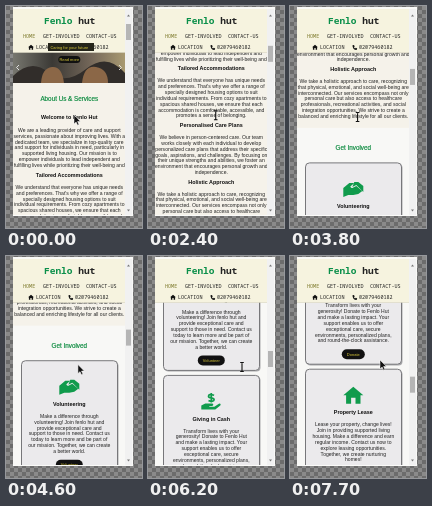
Animation, 136 px wide and 222 px high, one loop 8 s. Source, as an HTML page:

```html
<!DOCTYPE html>
<html lang="en">
<head>
<meta charset="utf-8">
<title>Scrolling page</title>
<style>
  html, body { margin: 0; width: 100%; height: 100%; overflow: hidden; background: #777; }
  svg { display: block; width: 136px; height: 222px; }
  text { text-anchor: middle; font-family: "Liberation Sans", Arial, sans-serif; }
  .body { font-size: 5.05px; fill: #222; }
  .head { font-size: 5.4px; font-weight: bold; fill: #111; }
  .title { font-size: 6.3px; fill: #0a8a3e; stroke: #0a8a3e; stroke-width: .18; }
  .pill { font-size: 4px; fill: #e0cf3a; }
  .mono text { font-family: "Noto Sans Mono", "DejaVu Sans Mono", monospace; text-anchor: start; font-size: 5.1px; fill: #222; }
  .mono .logo { font-size: 9.5px; font-weight: 600; }
</style>
</head>
<body>
<svg viewBox="0 0 136 222">
  <defs>
    <pattern id="check" width="8" height="8" patternUnits="userSpaceOnUse">
      <rect width="8" height="8" fill="#8a8a8a"/>
      <path d="M0 0h4v4h-4zM4 4h4v4h-4z" fill="#6c6c6c"/>
    </pattern>
    <clipPath id="page"><rect x="7" y="3" width="112" height="206"/></clipPath>
    <linearGradient id="photo">
      <stop offset="0" stop-color="#77776f"/>
      <stop offset=".35" stop-color="#3b3935"/>
      <stop offset=".7" stop-color="#75685a"/>
      <stop offset="1" stop-color="#a99a72"/>
    </linearGradient>
    <g id="house"><path d="M0-8.5L10 0H7.2V8.5H2.2V2.5H-2.2V8.5H-7.2V0H-10Z"/></g>
    <g id="hands">
      <path d="M-10-1L-4-6L1-6L-3-2.5Q-2 0 0-1.5L3-3L9 2L5 5L0 6L-5 6L-10 8Z"/>
      <path d="M1-7H5L10-3V3L3-4L-1-2Z"/>
    </g>
    <g id="cash">
      <path d="M-10 4L-6 2H1Q3 3 1 4.5H-2V5.3H3L8 2Q10 2 9 4L4 8H-10Z"/>
      <path d="M2.8-6.2Q-2.8-8-2.8-5.2Q-2.8-3.7 0-3.5Q2.8-3 2.8-1.6Q2.6 .7-2.8-.8M0-8.5V1.2" fill="none" stroke="#109b4c" stroke-width="1.7"/>
    </g>
  </defs>

  <rect width="136" height="222" fill="url(#check)"/>
  <rect x="7" y="1" width="120" height="209" fill="#fafaf8"/>
  <g clip-path="url(#page)">
    <rect x="7" y="3" width="112" height="206" fill="#f5f2ea"/>
    <g id="content"></g>
  </g>

  <g class="mono">
    <rect x="7" y="3" width="112" height="43.5" fill="#f6f3df"/>
    <path d="M7 46.5H119" stroke="#d9d5c2" stroke-width=".6"/>
    <text class="logo" x="38" y="18" xml:space="preserve"><tspan fill="#0a8f4a">Fenlo</tspan> hut</text>
    <text x="17" y="32" style="fill:#7d7a2c">HOME</text>
    <text x="37" y="32">GET-INVOLVED</text>
    <text x="80" y="32">CONTACT-US</text>
    <use href="#house" transform="translate(25 41.3) scale(.29)" fill="#111"/>
    <text x="30" y="43.3">LOCATION</text>
    <path d="M62.5 39.3L64 38.9L64.7 40.4L63.9 41.2L65 42.4L65.9 41.8L67.2 42.6L66.6 44Q62.5 44 62.5 39.3Z" fill="#111"/>
    <text x="69" y="43.3">02079460182</text>
  </g>

  <g clip-path="url(#page)"><g id="banner"></g></g>

  <rect x="119" y="3" width="7" height="206" fill="#f1f1f1"/>
  <path d="M121 10.5L122.5 8.5L124 10.5ZM121 203.5L122.5 205.5L124 203.5Z" fill="#777"/>
  <rect id="thumb" x="120" width="5" height="16" fill="#b5b5b5"/>

  <path id="arrow" d="M0 0V9L2.1 7.1L3.6 10.2L5 9.5L3.6 6.5H6.4Z" fill="#111" stroke="#fff" stroke-width=".5"/>
  <path id="beam" d="M-1.8-4.5H-.5L0-4L.5-4.5H1.8M0-4V4M-1.8 4.5H-.5L0 4L.5 4.5H1.8" fill="none" stroke="#111" stroke-width="1.1"/>
</svg>
<script>
const NS = "http://www.w3.org/2000/svg";
const $ = id => document.getElementById(id);
const MID = 63.3, LEAD = 5.85, NOTCH = 31.3, LOOP = 8000;

function add(parent, tag, attrs, label) {
  const node = document.createElementNS(NS, tag);
  for (const key in attrs) node.setAttribute(key, attrs[key]);
  if (label) node.textContent = label;
  parent.appendChild(node);
  return node;
}

const content = $("content"), banner = $("banner");

// y is the vertical middle of the line
const line = (cls, y, label, parent = content) =>
  add(parent, "text", { class: cls, x: MID, y: y + 1.9 }, label);

function block(heading, y, gap, copy) {
  line("head", y, heading);
  copy.split("|").forEach((row, i) => line("body", y + gap + i * LEAD, row));
}

function pill(y, width, label, parent = content, h = 10) {
  add(parent, "rect", { x: MID - width / 2, y: y - h / 2, width, height: h, rx: h / 2, fill: "#111" });
  line("pill", y - .4, label, parent);
}

function card(index, icon, heading, copy, width, label) {
  const top = 376 + index * 119;
  const box = { x: 15.5, width: 96, height: 114, rx: 4 };
  add(content, "rect", { ...box, x: 16.5, y: top + 1.2, fill: "#a9a9ac" });
  add(content, "rect", { ...box, y: top, fill: "#ebeaec", stroke: "#77777a", "stroke-width": 1 });
  add(content, "use", { href: "#" + icon, transform: `translate(${MID} ${top + 26})`, fill: "#109b4c" });
  block(heading, top + 43.3, 12, copy);
  pill(top + 104, width, label);
}

function hero() {
  add(content, "rect", { x: 7, y: 46, width: 112, height: 31, fill: "url(#photo)" });
  add(content, "path", { d: "M7 70Q25 52 42 66T80 63T119 67V77H7Z", fill: "#312d2a" });
  add(content, "path", { d: "M35 77Q36 62 46 61T58 77ZM76 77Q78 59 90 61T102 77Z", fill: "#8b6747" });
  add(content, "path", { d: "M13 59L10.5 61.5L13 64M113 59L115.5 61.5L113 64", fill: "none", stroke: "#eee", "stroke-width": .9 });
  add(banner, "rect", { x: 42, y: 37, width: 46, height: 8, fill: "#25251a" });
  line("pill", 41, "Caring for your future", banner);
  pill(53.5, 22, "Read more", banner, 7);
}

hero();
line("title", 93, "About Us & Services");
block("Welcome to Fenlo Hut", 111, 13,
  "We are a leading provider of care and support|services, passionate about improving lives. With a|dedicated team, we specialize in top-quality care|and support for individuals in need, particularly in|supported living housing. Our mission is to|empower individuals to lead independent and|fulfilling lives while prioritizing their well-being and");
block("Tailored Accommodations", 168.7, 12.2,
  "We understand that everyone has unique needs|and preferences. That's why we offer a range of|specially designed housing options to suit|individual requirements. From cozy apartments to|spacious shared houses, we ensure that each|accommodation is comfortable, accessible, and|promotes a sense of belonging.");
block("Personalised Care Plans", 225.7, 11.8,
  "We believe in person-centered care. Our team|works closely with each individual to develop|personalized care plans that address their specific|goals, aspirations, and challenges. By focusing on|their unique strengths and abilities, we foster an|environment that encourages personal growth and|independence.");
block("Holistic Approach", 282.5, 11.6,
  "We take a holistic approach to care, recognizing|that physical, emotional, and social well-being are|interconnected. Our services encompass not only|personal care but also access to healthcare|professionals, recreational activities, and social|integration opportunities. We strive to create a|balanced and enriching lifestyle for all our clients.");
add(content, "rect", { x: 7, y: 341, width: 112, height: 420, fill: "#f8f8f6" });
line("title", 361.3, "Get Involved");
card(0, "hands", "Volunteering",
  "Make a difference through|volunteering! Join fenlo hut and|provide exceptional care and|support to those in need. Contact us|today to learn more and be part of|our mission. Together, we can create|a better world.", 27, "Volunteer");
card(1, "cash", "Giving in Cash",
  "Transform lives with your|generosity! Donate to Fenlo Hut|and make a lasting impact. Your|support enables us to offer|exceptional care, secure|environments, personalized plans,|and round-the-clock assistance.", 23, "Donate");
card(2, "house", "Property Lease",
  "Lease your property, change lives!|Join in providing supported living|housing. Make a difference and earn|regular income. Contact us now to|explore leasing opportunities.|Together, we create nurturing|homes!", 23, "Lease");

// [time, wheel notches]
const scroll = [[0, 0], [200, 1], [1100, 1], [1200, 2], [1300, 2], [1400, 3], [2300, 3], [2800, 5],
  [2900, 5], [3100, 6], [3700, 6], [3800, 7], [4000, 7], [4100, 8], [4400, 8], [5000, 10],
  [5300, 10], [5500, 11], [6100, 11], [6200, 12], [6300, 12], [6700, 14], [7000, 14], [7700, 16]];
const mouseX = [[0, 68], [4500, 67.5], [5100, 94], [6700, 94], [7700, 90]];
const mouseY = [[0, 109], [1200, 107], [2800, 110], [3800, 111], [5100, 107], [6200, 111], [7700, 104]];
// spans during which the pointer rests on text
const beams = [[1200, 4500], [5500, 7100]];

function at(keys, t) {
  const i = keys.findIndex(k => k[0] > t);
  if (i < 0) return keys[keys.length - 1][1];
  const [t0, a] = keys[i - 1], [t1, b] = keys[i];
  return a + (b - a) * (t - t0) / (t1 - t0);
}

const move = (node, x, y) => node.setAttribute("transform", `translate(${x} ${y})`);

function draw(now) {
  const t = Math.floor(now % LOOP / 100) * 100;
  const y = at(scroll, t) * NOTCH;
  move(content, 0, -y);
  move(banner, 0, -y);
  $("thumb").setAttribute("y", 18 + y * .205);
  const onText = beams.some(([a, b]) => t >= a && t < b);
  for (const id of ["arrow", "beam"]) {
    move($(id), at(mouseX, t), at(mouseY, t));
    $(id).style.display = (id === "beam") === onText ? "" : "none";
  }
}

const start = performance.now();
function tick() {
  draw(performance.now() - start);
  requestAnimationFrame(tick);
}
tick();
</script>
</body>
</html>
```
